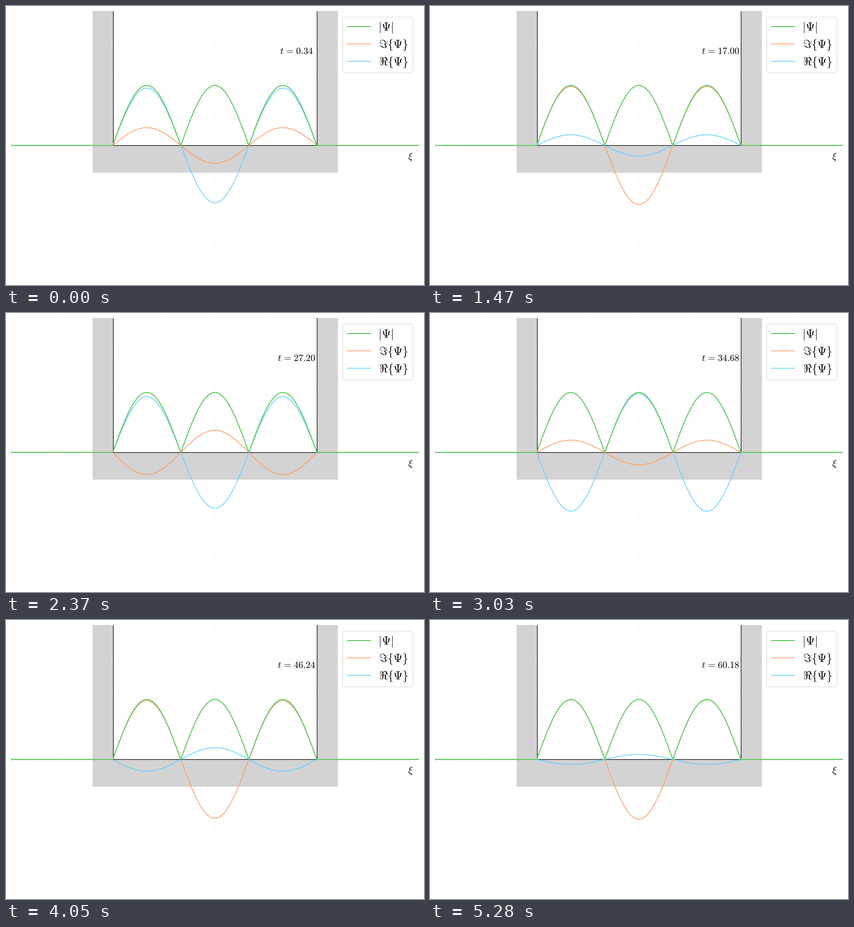
A matplotlib script that plays this animation: 917 px wide and 611 px high, repeating every 5400 ms.

```python
import numpy as np
import matplotlib.pyplot as plt
from matplotlib.animation import FuncAnimation
from matplotlib.patches import FancyBboxPatch, PathPatch, Polygon, Rectangle
from matplotlib.textpath import TextPath
from matplotlib.transforms import Affine2D

plt.rcParams["mathtext.fontset"] = "cm"

W, H, DPI = 917, 611, 64
PX = 72 / DPI                    # points per pixel
PT = 1.061                       # pixels per design point

LEFT, RIGHT, TOP, BOTTOM = 11.46, 905.54, 11.26, 599.54
UX = (RIGHT - LEFT) / 20         # x runs from -10 to 10
UY = (BOTTOM - TOP) / 2          # y runs from -1 to 1

GREEN, ORANGE, BLUE = "#5fca5f", "#ff9966", "#66ccff"
WALL = 5                         # half width of the well
SPAN = 10.017                    # effective width, wider on the left
STEPS, LAST = 180, 176
DT = 0.34
OMEGA = (3 * np.pi / SPAN) ** 2 / 2


def sx(x):
    return LEFT + (x + 10) * UX


def sy(y):
    return TOP + (1 - y) * UY


fig = plt.figure(figsize=(W / DPI, H / DPI), dpi=DPI, facecolor="white")
ax = fig.add_axes([0, 0, 1, 1])
ax.set_xlim(0, W)
ax.set_ylim(H, 0)
ax.axis("off")

area = Rectangle((LEFT, TOP), RIGHT - LEFT, BOTTOM - TOP,
                 transform=ax.transData)


def line(x, y, color, pts, z, **kw):
    ln, = ax.plot(x, y, color=color, lw=pts * PT * PX, zorder=z, **kw)
    return ln


def ink(x, y, s, size, align):
    """Outline of s on baseline y; align 0 is ink left, 0.5 ink centre."""
    path = TextPath((0, 0), s, size=size)
    box = path.get_extents()
    place = Affine2D().translate(-box.x0 - align * box.width, 0)
    return place.scale(1, -1).translate(x, y).transform_path(path)


def label(*args):
    patch = PathPatch(ink(*args), fc="black", lw=0, zorder=12)
    return ax.add_patch(patch)


# Walls and floor of the well
outer, inner = WALL + 1, WALL
shape = [(-outer, 1), (-outer, -0.2), (outer, -0.2), (outer, 1),
         (inner, 1), (inner, 0), (-inner, 0), (-inner, 1)]
wall = Polygon([(sx(x), sy(y)) for x, y in shape], fc="#d3d3d3",
               ec="#d3d3d3", lw=PT * PX, zorder=1)
ax.add_patch(wall)
wall.set_clip_path(area)

# Loosely dotted grid
for i in range(8):
    gx, gy = sx(-10 + 2.5 * i), sy(1 - 0.25 * i)
    for xs, ys in (([gx, gx], [BOTTOM, TOP]), ([LEFT, RIGHT], [gy, gy])):
        line(xs, ys, "#b0b0b0", 0.8, 1.5,
             linestyle=(0, (1, 10))).set_clip_path(area)

line([sx(-WALL), sx(-WALL), sx(WALL), sx(WALL)],
     [TOP, sy(0), sy(0), TOP], "black", 1.2, 2, solid_joinstyle="miter",
     solid_capstyle="butt")

# Third eigenstate, zero outside the well
x = np.linspace(-10, 10, 1201)
u = x - WALL + SPAN
psi = np.where((u >= 0) & (u <= SPAN),
               np.sqrt(2 / SPAN) * np.sin(3 * np.pi * u / SPAN), 0)
flat = np.full_like(x, sy(0))
real = line(sx(x), flat, BLUE, 1.5, 3)
imag = line(sx(x), flat, ORANGE, 1.5, 4)
line(sx(x), sy(abs(psi)), GREEN, 2, 5)
for ln in ax.lines[-3:]:
    ln.set_clip_path(area)

label(887.5, 335.5, r"$\xi$", 21.1, 0.5)


def clock_path(t):
    s = r"$t\hspace{0.115}=\hspace{0.115}%.2f$" % t
    return ink(sx(4), 105, s, 20.6, 0.5)


clock = PathPatch(clock_path(DT), fc="black", lw=0, zorder=12)
ax.add_patch(clock)

# Legend
ax.add_patch(FancyBboxPatch((739.2, 24.3), 153.8, 122.1,
                            boxstyle="round,pad=0,rounding_size=5.1",
                            fc=(1, 1, 1, 0.8), ec=(0.8, 0.8, 0.8, 0.8),
                            lw=PT * PX, zorder=10))
rows = [(GREEN, 2, r"$|\Psi|$"),
        (ORANGE, 1.5, r"$\Im\lbrace\Psi\rbrace$"),
        (BLUE, 1.5, r"$\Re\lbrace\Psi\rbrace$")]
for i, (color, width, name) in enumerate(rows):
    y = 44.8 + 38.1 * i
    line([749.4, 800.3], [y, y], color, width, 11)
    label(820.4, y + 8.8, name, 25.4, 0)


def draw(step):
    k = min(step, LAST)
    phase = OMEGA * DT * (k + 2)
    real.set_ydata(sy(psi * np.cos(phase)))
    imag.set_ydata(sy(psi * np.sin(phase)))
    clock.set_path(clock_path(DT * (k + 1)))
    return real, imag, clock


anim = FuncAnimation(fig, draw, frames=STEPS, interval=30, repeat=True,
                     repeat_delay=0, init_func=lambda: draw(0), blit=False)
plt.show()
```
